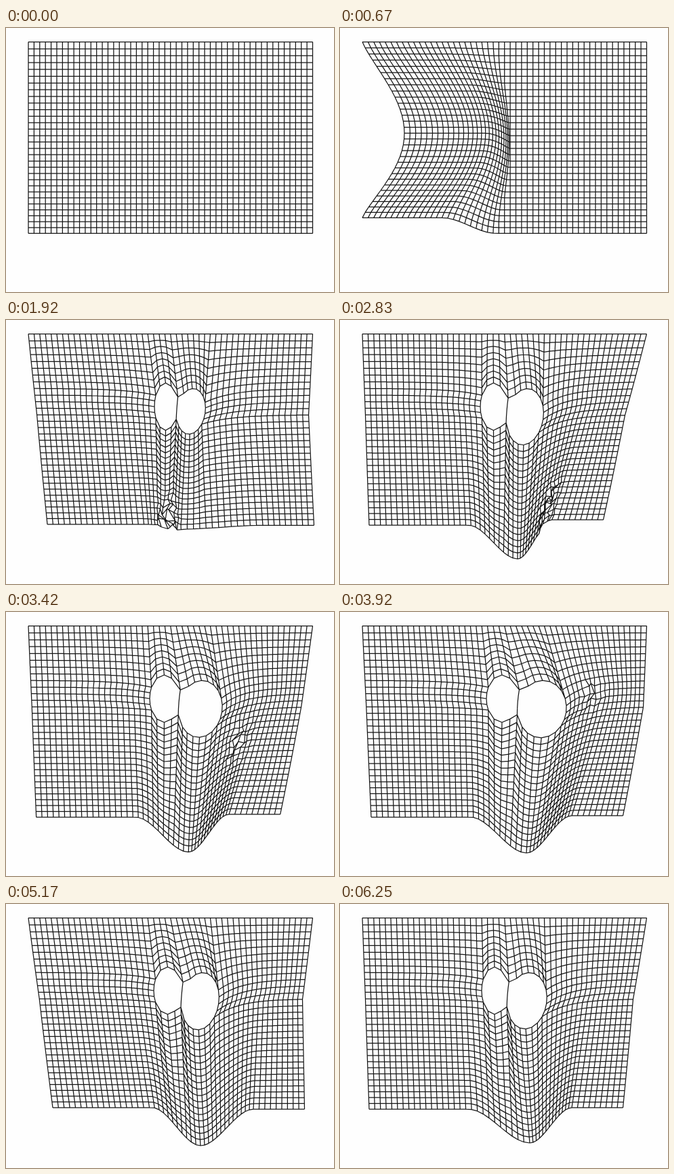
Animation of 484x390 px, one loop 6.33 s. Source, as an HTML page with a canvas:

```html
<!DOCTYPE html>
<html lang="en">
<head>
<meta charset="utf-8">
<title>Cloth</title>
<style>
  html, body { margin: 0; width: 100%; height: 100%; overflow: hidden; background: #fefefe; }
  canvas { display: block; }
</style>
</head>
<body>
<canvas id="stage" width="484" height="390"></canvas>
<script>
const COLS = 50, ROWS = 30, CELL = 8.39, LEFT = 33, TOP = 20.5;
const LOOP = 6330, FPS = 12, LAST = 75;
const PUSHED = 8, RIPPED = 15;                    // steps
const TEAR = { top: 8, low: 12, from: 21, mid: 25, to: 32 }; // cells
const CORNER = 0.5;                               // angle of a tear's corners
const SAG = { from: 17.5, low: 28, to: 41 };      // columns of the hanging fold

const ctx = document.getElementById('stage').getContext('2d');
const clamp = (v, a, b) => Math.min(b, Math.max(a, v));
const lerp = (a, b, u) => a + (b - a) * u;
const mix = (p, q, u) => [lerp(p[0], q[0], u), lerp(p[1], q[1], u)];
const smooth = (a, b, v) => { const u = clamp((v - a) / (b - a), 0, 1); return u * u * (3 - 2 * u); };
const noise = n => { const s = Math.sin(n * 127.1) * 43758.5453; return (s - Math.floor(s)) * 2 - 1; };

// Gravity makes the upper rows slightly taller.
const rest = (i, j) => [LEFT + CELL * i, TOP + 10.3 * j - 0.029 * j * j];

// Key poses of the torn cloth. left, right, rightMid: shift of the side edges;
// lowX, lowY: lowest point; a, s, b: left end, strip and right end of the tears;
// ci, cj, rough: cell and strength of the crumpled spot.
const POSES = [
  { at: 23, left: 28, right: 2,   rightMid: -6,  lowX: 258, lowY: 309, a: 219, s: 252, b: 294, ci: 24, cj: 29, rough: 8 },
  { at: 34, left: 10, right: -64, rightMid: -32, lowX: 262, lowY: 353, a: 207, s: 246, b: 300, ci: 38, cj: 26, rough: 6 },
  { at: 47, left: 13, right: -35, rightMid: -5,  lowX: 275, lowY: 356, a: 216, s: 262, b: 334, ci: 38, cj: 9,  rough: 4 },
  { at: 62, left: 36, right: -12, rightMid: -15, lowX: 287, lowY: 357, a: 218, s: 259, b: 314, ci: 38, cj: 9,  rough: 0 },
  { at: 75, left: 10, right: -35, rightMid: -20, lowX: 280, lowY: 353, a: 209, s: 247, b: 305, ci: 32, cj: 29, rough: 0 }
];

function poseAt(n) {
  const k = clamp(POSES.findIndex(p => p.at > n), 1, POSES.length - 1);
  const p = POSES[n >= LAST ? POSES.length - 1 : k - 1], q = POSES[n >= LAST ? POSES.length - 1 : k];
  const u = p === q ? 0 : smooth(p.at, q.at, n);
  return Object.fromEntries(Object.keys(p).map(key => [key, lerp(p[key], q[key], u)]));
}

// The hand sweeps in from the left and gathers the cloth at a front column.
function push(i, j, n) {
  const reach = Math.min(1, n / PUSHED);
  const amount = n < PUSHED ? reach : 1 - smooth(PUSHED, 20, n);
  const arc = Math.sin(Math.PI * j / ROWS);
  const u = i / ((23.5 + 2.5 * arc) * reach || 1);
  if (u >= 1) return [0, 0];
  return [
    62 * amount * Math.max(0, arc) ** 1.2 * (1 - u ** 3),
    -23 * amount * (j / ROWS) ** 0.8 * (1 - smooth(0.6, 1, u))
  ];
}

// Point on an oval where the cell corner (i, j) of a tear's rim ends up.
function rim(i, j, from, to, oval) {
  const u = 2 * (i - from) / (to - from) - 1;
  const v = 2 * (j - TEAR.top) / (TEAR.low - TEAR.top) - 1;
  const onSide = Math.abs(u) === 1;
  const angle = onSide ? v * CORNER : u * (Math.PI / 2 - CORNER);
  const x = oval.rx * (onSide ? u * Math.cos(angle) : Math.sin(angle));
  const y = oval.ry * (onSide ? Math.sin(angle) : Math.sign(v) * Math.cos(angle));
  const c = Math.cos(oval.tilt), s = Math.sin(oval.tilt);
  return [oval.cx + x * c - y * s, oval.cy + x * s + y * c];
}

function tearShift(i, j, p) {
  const ry = 34 + (p.lowY - 309) * 0.18;
  const small = { cx: (p.a + p.s) / 2, rx: (p.s - p.a) / 2, cy: 128, ry: 35, tilt: 0 };
  const big = { cx: (p.s + p.b) / 2, rx: (p.b - p.s) / 2, cy: 101 + ry, ry, tilt: 0.15 };
  const l = rim(i, j, TEAR.from, TEAR.mid, small);
  const r = rim(i, j, TEAR.mid, TEAR.to, big);
  const q = i < TEAR.mid ? l : i > TEAR.mid ? r : mix(l, r, 0.5);
  const o = rest(i, j);
  return [q[0] - o[0], q[1] - o[1]];
}

// The hem: straight at both sides, sagging to its lowest point between.
function hemShift(i, p) {
  const low = rest(SAG.low, ROWS);
  const end = i < SAG.low ? SAG.from : SAG.to;
  const dx = i < SAG.low ? p.left : p.right;
  const u = clamp((i - end) / (SAG.low - end), 0, 1);
  return [lerp(dx, p.lowX - low[0], u), lerp(-dx * dx / 500, p.lowY - low[1], smooth(0, 1, u))];
}

function hang(i, j, p) {
  const c = clamp(i, TEAR.from, TEAR.to), r = clamp(j, TEAR.top, TEAR.low);
  let [dx, dy] = tearShift(c, r, p);
  const away = Math.abs(i - c);
  if (away) {
    const side = (i < c ? p.left * 0.45 : p.rightMid) * r / TEAR.low;
    dx = lerp(dx, side, away / (i < c ? TEAR.from : COLS - TEAR.to));
    dy *= Math.exp(-away / 5);
  }
  if (j < TEAR.top) return [dx * j / TEAR.top, dy * j / TEAR.top];
  const d = mix([dx, dy], hemShift(i, p), (j - r) / (ROWS - TEAR.low));
  const w = p.rough * Math.exp(-(((i - p.ci) / 2.5) ** 2) - ((j - p.cj) / 4) ** 2);
  return [d[0] + w * noise(i * 31 + j), d[1] + w * noise(i * 17 + j * 5 + 400)];
}

function meshAt(n) {
  const pose = poseAt(n), torn = smooth(RIPPED - 1, 22, n);
  return Array.from({ length: COLS + 1 }, (_, i) => Array.from({ length: ROWS + 1 }, (_, j) => {
    const o = rest(i, j), a = push(i, j, n), b = hang(i, j, pose);
    return [o[0] + a[0] + b[0] * torn, o[1] + a[1] + b[1] * torn];
  }));
}

function draw(n) {
  const mesh = meshAt(n), torn = n >= RIPPED;
  const { top, low, from, mid, to } = TEAR;
  const noVertical = (i, j) => torn && j >= top && j < low && i > from && i < to && i !== mid;
  const noHorizontal = (i, j) => torn && j > top && j < low && i >= from && i < to;
  const join = (p, q) => { ctx.moveTo(p[0], p[1]); ctx.lineTo(q[0], q[1]); };

  ctx.fillStyle = '#fefefe';
  ctx.fillRect(0, 0, 484, 390);
  ctx.strokeStyle = '#161616';
  ctx.lineWidth = 1.25;
  ctx.beginPath();
  for (let i = 0; i <= COLS; i++) {
    for (let j = 0; j <= ROWS; j++) {
      if (j < ROWS && !noVertical(i, j)) join(mesh[i][j], mesh[i][j + 1]);
      if (i < COLS && !noHorizontal(i, j)) join(mesh[i][j], mesh[i + 1][j]);
    }
  }
  ctx.stroke();
}

const start = performance.now();
let shown = -1;
function tick() {
  const t = (performance.now() - start) % LOOP;
  const n = Math.min(LAST, Math.floor(t * FPS / 1000 + 0.1));
  if (n !== shown) draw(shown = n);
  requestAnimationFrame(tick);
}
tick();
</script>
</body>
</html>
```
